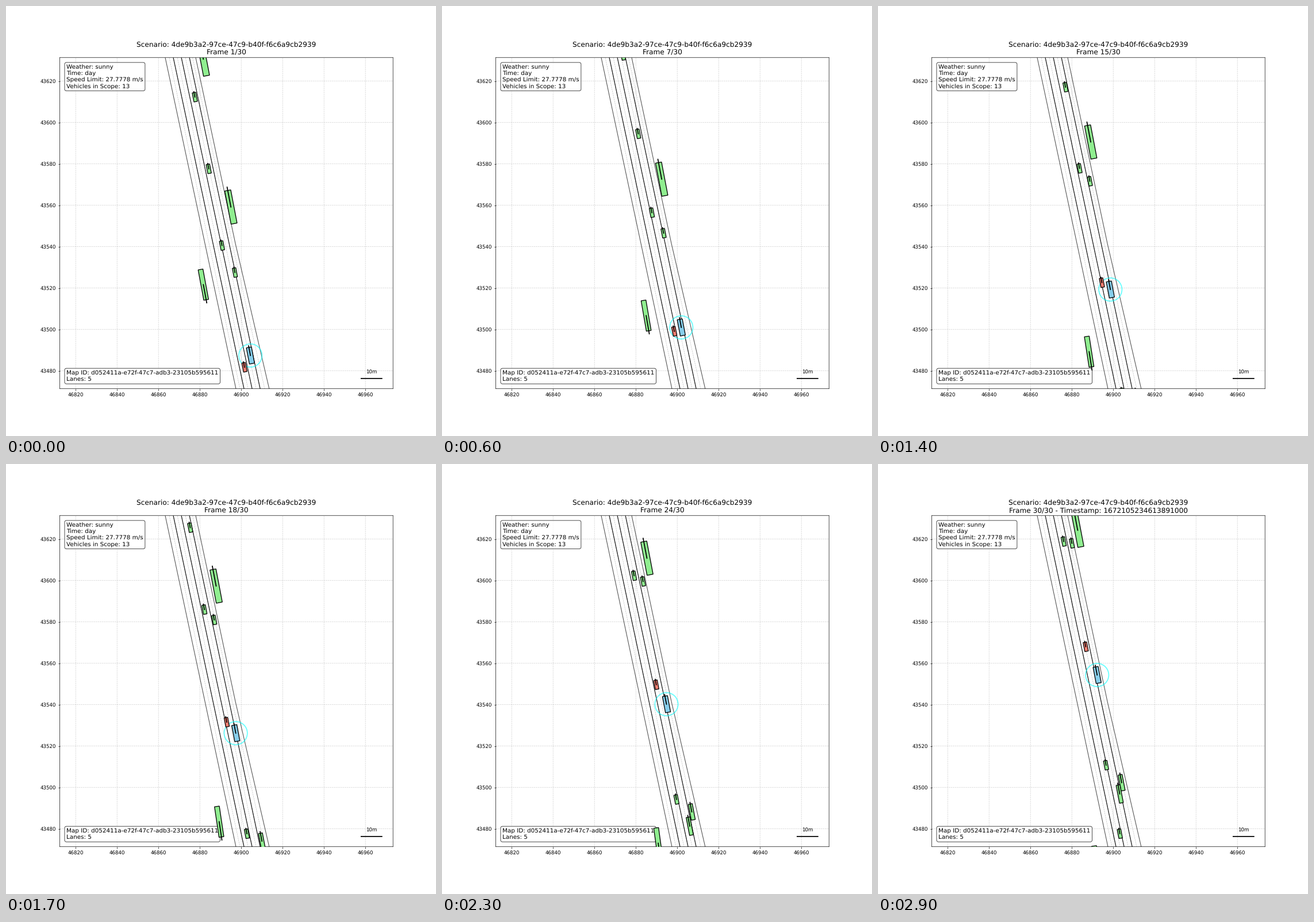
A matplotlib script that plays this animation: 748x748 px, repeating every 3000 ms.

```python
import matplotlib.pyplot as plt
import numpy as np
from matplotlib.animation import FuncAnimation
from matplotlib.patches import Circle, Polygon

STAGE, FRAMES, INTERVAL = 748, 30, 100
EAST, NORTH = 46800, 43400          # map origin, all positions are metres from it
LEFT, RIGHT, BOTTOM, TOP = 12.3, 173.33, 71.36, 231.36
SCENARIO = "4de9b3a2-97ce-47c9-b40f-f6c6a9cb2939"
MAP_ID = "d052411a-e72f-47c7-adb3-23105b595611"
TIMESTAMP = 1672105234613891000
CAR, TRUCK = (4.45, 1.72), (16.3, 2.95)

# Unsnapped lines and unhinted glyphs give the look of a scaled-down plot.
plt.rcParams.update({"font.family": "DejaVu Sans", "path.snap": False,
                     "text.hinting": "none"})
fig, ax = plt.subplots(figsize=(12, 12), dpi=STAGE / 12)
ax.set(xlim=(EAST + LEFT, EAST + RIGHT), ylim=(NORTH + BOTTOM, NORTH + TOP))
ax.autoscale(False)
ax.grid(True, linestyle="--", alpha=0.6)


class Vehicle:
    """A box that drives along the road; speeds are in metres per step."""

    def __init__(self, x, y, speed, gain=0, drift=0.187, curve=0, size=CAR,
                 color="lightgreen", heading=10.8, turn=0, z=5):
        self.x, self.y, self.speed, self.gain = x, y, speed, gain
        self.drift, self.curve, self.size = drift, curve, size
        self.heading, self.turn = heading, turn
        self.body = ax.add_patch(Polygon(np.zeros((4, 2)), facecolor=color,
                                         edgecolor="black", lw=1.5, zorder=z))
        self.nose, = ax.plot([], [], color="black", lw=2, zorder=z + 0.01)

    def move(self, i):
        travel = self.speed * i + self.gain * i ** 2
        center = np.array([EAST + self.x - self.drift * travel + self.curve * i ** 2,
                           NORTH + self.y + travel])
        a = np.radians(self.heading + self.turn * i)
        ahead = np.array([-np.sin(a), np.cos(a)]) * self.size[0] / 2
        side = np.array([np.cos(a), np.sin(a)]) * self.size[1] / 2
        self.body.set_xy([center + ahead - side, center + ahead + side,
                          center - ahead + side, center - ahead - side])
        tip = center + 1.2 * ahead
        self.nose.set_data([center[0], tip[0]], [center[1], tip[1]])
        return center


def draw_road():
    ys = np.array([TOP, 141.57, BOTTOM])
    edges = [63.27 + 3.9 * k + 0.2135 * (TOP - ys) for k in range(4)]
    edges.append(np.array([77.99, 97.16, 113.5]))     # ramp side bends outwards
    for left, right in zip(edges, edges[1:]):
        for edge in (left, right):
            ax.plot(EAST + edge, NORTH + ys, color="black", lw=1.2, alpha=0.7)
        ax.plot(EAST + (left + right) / 2, NORTH + ys, color="gray", lw=0.8,
                ls="--", alpha=0.5)


def info(y, va, *lines):
    ax.text(0.02, y, "\n".join(lines), transform=ax.transAxes, fontsize=12, va=va,
            bbox=dict(boxstyle="round", facecolor="white", alpha=0.8))


draw_road()
info(0.98, "top", "Weather: sunny", "Time: day", "Speed Limit: 27.7778 m/s",
     "Vehicles in Scope: 13")
info(0.02, "bottom", f"Map ID: {MAP_ID}", "Lanes: 5")

ax.plot([EAST + 157.95, EAST + 167.95], [NORTH + 76.3] * 2, color="black", lw=2)
ax.text(EAST + 162.9, NORTH + 78.2, "10m", ha="center", va="bottom", fontsize=10)

ego = Vehicle(104.44, 87.4, 2.25, gain=0.002, drift=0.1825, size=(7.95, 2.5),
              color="skyblue")
traffic = [
    Vehicle(101.55, 81.71, 2.87, gain=0.0036, drift=0.172, color="salmon"),
    Vehicle(77.58, 212.27, 3.355),
    Vehicle(84.3, 177.6, 2.819),
    Vehicle(90.69, 140.54, 2.63, gain=0.0024),
    Vehicle(96.94, 127.49, 3.18, gain=-0.0021),
    Vehicle(111.5, 30.7, 2.76),
    Vehicle(118.16, -2.4, 2.76),
    Vehicle(81.69, 230.6, 2.29, size=TRUCK),
    Vehicle(95.0, 159.15, 2.245, size=TRUCK),
    # oncoming truck, braking and straightening
    Vehicle(81.69, 121.65, -2.63, gain=0.0225, drift=0.228, curve=-0.0037,
            size=(14.9, 2.35), heading=190.5, turn=-0.12),
    Vehicle(118.4, 34.0, 2.355, drift=0.21, size=(7.8, 1.95)),
    Vehicle(117.2, 21.65, 2.593, size=(8.8, 1.85)),
]
halo = ax.add_patch(Circle((0, 0), 5.6, fill=False, edgecolor="cyan", lw=2,
                           alpha=0.6, zorder=4))


def update(i):
    halo.center = ego.move(i)
    for vehicle in traffic:
        vehicle.move(i)
    stamp = f" - Timestamp: {TIMESTAMP}" if i == FRAMES - 1 else ""
    ax.set_title(f"Scenario: {SCENARIO}\nFrame {i + 1}/{FRAMES}{stamp}", fontsize=14)
    return []


anim = FuncAnimation(fig, update, frames=FRAMES, interval=INTERVAL, repeat=True)
plt.show()
```
